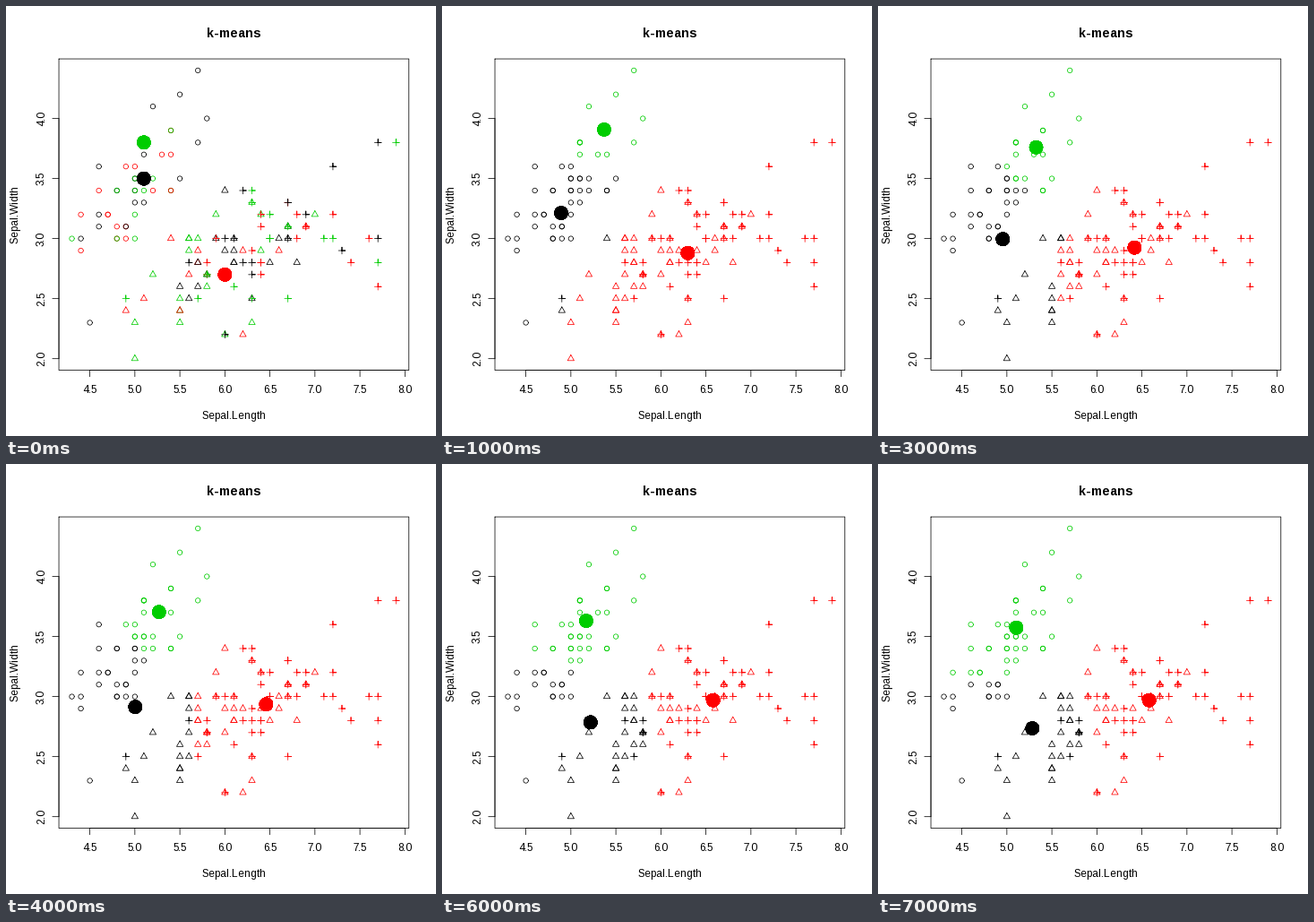
Write a matplotlib script that moves like this. It is 480 px wide and 480 px high and loops after 8000 ms.

```python
import numpy as np
import matplotlib.pyplot as plt
from matplotlib.animation import FuncAnimation
from matplotlib.collections import LineCollection

# Hinting at whole pixels gives letters whole-pixel advances
plt.rcParams.update({"font.family": "Liberation Sans",
                     "text.hinting": "force_autohint",
                     "text.hinting_factor": 1})

SIZE, DPI = 480, 80
PT = 72 / DPI                      # points per pixel
STROKE = 0.75 * PT
LEFT, TOP, RIGHT, BOTTOM = 59.04, 59.04, 449.76, 406.56
X0, X1, Y0, Y1 = 4.156, 8.044, 1.904, 4.496
STEPS = 8
COLORS = np.array(["#000000", "#ff0000", "#00cd00"])

# Rows of one flower kind: sepal width, starting colours, sepal lengths
CIRCLES = [
    (4.4, "k", [5.7]),
    (4.2, "k", [5.5]),
    (4.1, "k", [5.2]),
    (4.0, "k", [5.8]),
    (3.9, "rg", [5.4, 5.4]),
    (3.8, "kggg", [5.7, 5.1, 5.1, 5.1]),
    (3.7, "rkr", [5.4, 5.1, 5.3]),
    (3.6, "rkr", [5.0, 4.6, 4.9]),
    (3.5, "kkgkkg", [5.1, 5.1, 5.2, 5.5, 5.0, 5.0]),
    (3.4, "rkgkggrrg", [4.6, 5.0, 5.0, 4.8, 4.8, 5.4, 5.4, 5.2, 5.1]),
    (3.3, "kk", [5.1, 5.0]),
    (3.2, "rrgrk", [4.7, 4.7, 5.0, 4.4, 4.6]),
    (3.1, "krkr", [4.6, 4.9, 4.9, 4.8]),
    (3.0, "rrgggk", [4.9, 4.8, 4.8, 4.3, 5.0, 4.4]),
    (2.9, "r", [4.4]),
    (2.3, "k", [4.5]),
]
TRIANGLES = [
    (3.4, "k", [6.0]),
    (3.3, "g", [6.3]),
    (3.2, "ggg", [7.0, 6.4, 5.9]),
    (3.1, "rkg", [6.9, 6.7, 6.7]),
    (3.0, "kggkkrkg", [5.9, 5.6, 5.6, 6.6, 6.7, 5.4, 6.1, 5.7]),
    (2.9, "rkggkrr", [6.6, 6.1, 5.6, 6.4, 6.0, 5.7, 6.2]),
    (2.8, "krkkkk", [6.5, 5.7, 5.7, 6.1, 6.1, 6.8]),
    (2.7, "gkgrr", [5.2, 5.8, 5.8, 6.0, 5.6]),
    (2.6, "kkg", [5.7, 5.5, 5.8]),
    (2.5, "kkgr", [5.6, 6.3, 5.5, 5.1]),
    (2.4, "rgr", [4.9, 5.5, 5.5]),
    (2.3, "ggg", [5.5, 6.3, 5.0]),
    (2.2, "gr", [6.0, 6.2]),
    (2.0, "g", [5.0]),
]
PLUSES = [
    (3.8, "kg", [7.7, 7.9]),
    (3.6, "k", [7.2]),
    (3.4, "gk", [6.3, 6.2]),
    (3.3, "grk", [6.3, 6.7, 6.7]),
    (3.2, "grkrr", [6.5, 6.4, 6.9, 7.2, 6.8]),
    (3.1, "rrrg", [6.4, 6.9, 6.9, 6.7]),
    (3.0, "gkggrrgkkkkr",
     [7.1, 6.5, 6.5, 6.5, 7.6, 6.8, 7.2, 6.1, 7.7, 6.0, 6.7, 5.9]),
    (2.9, "rk", [6.3, 7.3]),
    (2.8, "rkgkrrrk", [5.8, 5.6, 7.7, 6.2, 6.4, 6.4, 7.4, 6.3]),
    (2.7, "rgrk", [5.8, 5.8, 6.4, 6.3]),
    (2.6, "rg", [7.7, 6.1]),
    (2.5, "gggg", [4.9, 6.7, 5.7, 6.3]),
    (2.2, "k", [6.0]),
]


def px(x):
    return LEFT + (x - X0) * (RIGHT - LEFT) / (X1 - X0)


def py(y):
    return BOTTOM - (y - Y0) * (BOTTOM - TOP) / (Y1 - Y0)


def circle(x, y, r=2.7):
    a = np.linspace(0, 2 * np.pi, 33)
    return np.column_stack([x + r * np.cos(a), y + r * np.sin(a)])


def triangle(x, y, up=4.2, half=3.64, down=2.1):
    return [(x, y - up), (x + half, y + down), (x - half, y + down), (x, y - up)]


def plus(x, y, h=3.82):
    return [(x - h, y), (x + h, y), (x, y), (x, y - h), (x, y + h)]


points, labels, glyphs = [], [], []
for rows, glyph in ((CIRCLES, circle), (TRIANGLES, triangle), (PLUSES, plus)):
    for width, start, lengths in rows:
        for color, length in zip(start, lengths):
            points.append((length, width))
            labels.append("krg".index(color))
            glyphs.append(glyph(px(length), py(width)))
points, labels = np.array(points), np.array(labels)

# k-means: assign to the nearest centre, then move each centre to its mean
centers = np.array([(5.1, 3.5), (6.0, 2.7), (5.1, 3.8)])
states = [(labels, centers)]
for _ in range(STEPS - 1):
    dist = ((points[:, None] - centers) ** 2).sum(axis=2)
    labels = dist.argmin(axis=1)
    centers = np.array([points[labels == k].mean(axis=0) for k in range(3)])
    states.append((labels, centers))

fig = plt.figure(figsize=(SIZE / DPI, SIZE / DPI), dpi=DPI, facecolor="white")
ax = fig.add_axes([0, 0, 1, 1])
ax.set_xlim(0, SIZE)
ax.set_ylim(SIZE, 0)
ax.axis("off")


def line(xs, ys):
    ax.plot(xs, ys, color="black", lw=STROKE, snap=False,
            solid_capstyle="round", solid_joinstyle="round")


def label(x, y, text, size=12, **kw):
    ax.text(x, y, text, fontsize=size * PT, ha="center", va="baseline",
            rotation_mode="anchor", **kw)


line([LEFT, RIGHT, RIGHT, LEFT, LEFT], [TOP, TOP, BOTTOM, BOTTOM, TOP])
line([px(4.5), px(8)], [BOTTOM, BOTTOM])
line([LEFT, LEFT], [py(2), py(4)])
for v in np.arange(4.5, 8.1, 0.5):
    line([px(v)] * 2, [BOTTOM, BOTTOM + 7.2])
    label(px(v), 432.3, f"{v:.1f}")
for v in np.arange(2.0, 4.1, 0.5):
    line([LEFT - 7.2, LEFT], [py(v)] * 2)
    label(43, py(v), f"{v:.1f}", rotation=90)
mid_x, mid_y = (LEFT + RIGHT) / 2, (TOP + BOTTOM) / 2
label(mid_x, 35, "k-means", 14.4, weight="bold")
label(mid_x, 461.2, "Sepal.Length")
label(14, mid_y, "Sepal.Width", rotation=90)

marks = LineCollection(glyphs, linewidths=STROKE, capstyle="round",
                       joinstyle="round", zorder=3)
marks.set_snap(False)
ax.add_collection(marks, autolim=False)

# One dot per data point: the stacked copies give the hard edge
dots = ax.scatter(np.zeros(len(points)), np.zeros(len(points)),
                  s=(2 * 7.58 * PT) ** 2, linewidths=0, zorder=4)
dots.set_snap(False)


def draw(i):
    labels, centers = states[i % STEPS]
    marks.set_color(COLORS[labels])
    spots = centers[labels]
    dots.set_offsets(np.column_stack([px(spots[:, 0]), py(spots[:, 1])]))
    dots.set_facecolor(COLORS[labels])
    return marks, dots


anim = FuncAnimation(fig, draw, frames=STEPS, interval=1000,
                     repeat=True, repeat_delay=0, blit=False)
plt.show()
```
